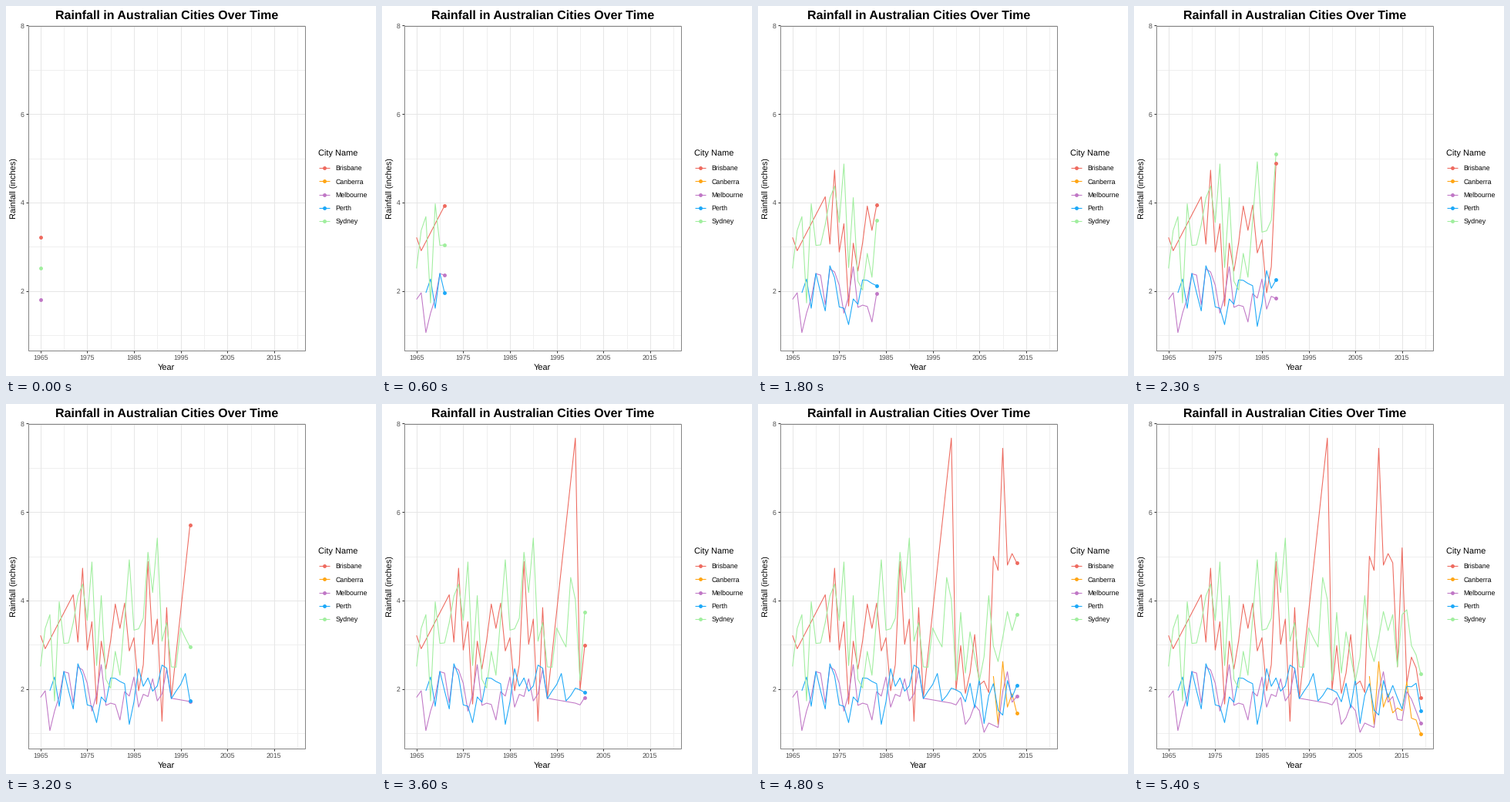
A matplotlib script that plays this animation: 480x480 px, repeating every 5.5 s.

```python
import matplotlib.pyplot as plt
import numpy as np
from matplotlib.animation import FuncAnimation
from matplotlib.patches import Rectangle

plt.rcParams["font.family"] = "Liberation Sans"
plt.rcParams["text.hinting"] = "none"

SIZE = 480
FIRST, LAST = 1965, 2019
LEFT, RIGHT, TOP, BOTTOM = 28.5, 387.5, 25.5, 446.8

# Runs of yearly readings, keyed by the first year of each run.
RAIN = {
    "Brisbane": ("#EE6A5F", {
        1965: [3.21, 2.91],
        1972: [4.13, 3.06, 4.73, 2.88, 3.52, 1.66, 3.08, 2.45, 3.09, 3.92,
               3.37, 3.94, 2.86, 3.16, 1.96, 2.55, 4.88, 3.01, 3.58, 1.27,
               3.84, 1.79],
        1999: [7.67, 1.97, 2.98, 1.90, 2.36, 3.23, 2.09, 2.18, 1.92, 5.00,
               4.68, 7.44, 4.80, 5.06, 4.85, 2.50, 5.19, 2.13, 2.72, 2.48,
               1.80],
    }),
    "Canberra": ("#FFA514", {
        2008: [2.29, 1.20, 2.62, 1.59, 1.89, 1.46, 1.57, 1.51, 2.16, 1.34,
               1.30, 0.98],
    }),
    "Melbourne": ("#C077C6", {
        1965: [1.81, 1.96, 1.06, 1.50, 1.83, 2.39, 2.36, 1.69, 2.50, 2.43,
               2.13, 1.50, 1.88, 2.55, 1.63, 1.68, 1.65, 1.30, 1.94, 1.84,
               2.27, 1.59, 1.88, 1.83, 2.23, 1.73, 1.89, 2.44, 1.79],
        1999: [1.68, 1.64, 1.81, 1.20, 1.35, 1.64, 1.51, 1.02, 1.23, 1.18,
               1.13, 1.95, 2.39, 1.70, 1.83, 1.31, 1.29, 1.94, 1.77, 1.50,
               1.22],
    }),
    "Perth": ("#1CA8F8", {
        1967: [1.96, 2.27, 1.61, 2.40, 1.96, 1.55, 2.57, 2.30, 1.64, 1.61,
               1.24, 1.82, 1.70, 2.25, 2.24, 2.17, 2.12, 1.20, 1.71, 2.46,
               2.06, 2.25, 1.95, 2.07, 2.54, 2.47, 1.78, 1.95, 2.10, 2.35,
               1.73, 1.85, 2.02, 1.98, 1.92, 1.71, 2.13, 1.57, 2.23, 1.22,
               1.85, 2.12, 1.52, 1.41, 2.19, 1.81, 2.08, 1.80, 1.55, 2.06,
               2.05, 2.13, 1.51],
    }),
    "Sydney": ("#A0EE9E", {
        1965: [2.51, 3.37, 3.68, 1.73, 3.97, 3.03, 3.04, 3.50, 4.10, 4.37,
               3.55, 4.87, 2.53, 4.11, 2.22, 2.02, 2.85, 2.31, 3.60, 4.92,
               3.33, 3.36, 3.60, 5.09, 4.18, 5.41, 3.08, 3.50, 2.50, 2.49,
               3.38, 3.15, 2.95, 4.52, 4.02, 2.19, 3.73, 2.36, 3.29, 2.73,
               2.18, 2.73, 4.11, 2.97, 2.62, 3.16, 3.75, 3.32, 3.68, 2.50,
               3.68, 3.79, 2.98, 2.77, 2.34],
    }),
}


def px(year):
    return 44.8 + 6.06 * (year - FIRST)


def py(inches):
    return 25.3 + 57.4 * (8 - inches)


def yearly(runs):
    """Years and readings with the gaps filled in linearly."""
    known = np.concatenate([start + np.arange(len(v)) for start, v in runs.items()])
    values = np.concatenate(list(runs.values()))
    years = np.arange(known[0], LAST + 1)
    return years, np.interp(years, known, values)


fig = plt.figure(figsize=(SIZE / 72, SIZE / 72), dpi=72, facecolor="white")
ax = fig.add_axes([0, 0, 1, 1])
ax.set(xlim=(0, SIZE), ylim=(SIZE, 0))
ax.axis("off")


def rule(x0, y0, x1, y1, color, z):
    ax.plot([x0, x1], [y0, y1], color=color, lw=1, zorder=z,
            solid_capstyle="butt")


def label(x, y, text, size=8.8, color="black", **kw):
    ax.text(x, y, text, fontsize=size, color=color, va="baseline", **kw)


def dot(x, y, color, z):
    return ax.plot(x, y, "o", ms=4.9, mew=0, color=color, zorder=z)[0]


def draw_chart():
    minor, major, tick, ink = "#EFEFEF", "#E6E6E6", "#333333", "#4D4D4D"
    for year in range(1970, 2021, 10):
        rule(px(year), TOP, px(year), BOTTOM, minor, 0)
    for inches in (1, 3, 5, 7):
        rule(LEFT, py(inches), RIGHT, py(inches), minor, 0)
    for year in range(1965, 2016, 10):
        x = px(year)
        rule(x, TOP, x, BOTTOM, major, 1)
        rule(x, BOTTOM, x, BOTTOM + 3, tick, 1)
        label(x, 459, str(year), color=ink, ha="center")
    for inches in (2, 4, 6, 8):
        y = py(inches)
        rule(LEFT, y, RIGHT, y, major, 1)
        rule(LEFT - 3, y, LEFT, y, tick, 1)
        label(23.2, y + 3.4, str(inches), color=ink, ha="right")
    ax.add_patch(Rectangle((LEFT, TOP), RIGHT - LEFT, BOTTOM - TOP, fill=False,
                           ec="#858585", lw=1, zorder=20))
    label(208.3, 17, "Rainfall in Australian Cities Over Time", 16,
          ha="center", weight="bold")
    label(208.3, 472, "Year", 11, ha="center")
    label(13.3, 236.3, "Rainfall (inches)", 11, ha="center", rotation=90,
          rotation_mode="anchor")


def draw_legend():
    label(404.6, 195, "City Name", 11)
    for i, (city, (color, _)) in enumerate(RAIN.items()):
        y = 210 + 17.28 * i
        ax.plot([406.3, 420.1], [y, y], color=color, lw=1.07,
                solid_capstyle="butt")
        dot([413.2], [y], color, 5)
        label(427.4, y + 3.2, city)


draw_chart()
draw_legend()

series = []
for z, (color, runs) in enumerate(RAIN.values()):
    years, values = yearly(runs)
    line, = ax.plot([], [], color=color, lw=1.07, zorder=3 + z,
                    solid_capstyle="butt", solid_joinstyle="round")
    series.append((years, px(years), py(values), line, dot([], [], color, 10 + z)))


def update(frame):
    for years, xs, ys, line, head in series:
        n = int(np.sum(years <= FIRST + frame))
        line.set_data(xs[:n], ys[:n])
        head.set_data(xs[:n][-1:], ys[:n][-1:])
    return [artist for s in series for artist in s[3:]]


anim = FuncAnimation(fig, update, frames=LAST - FIRST + 1, interval=100,
                     repeat=True, repeat_delay=0)
plt.show()
```
